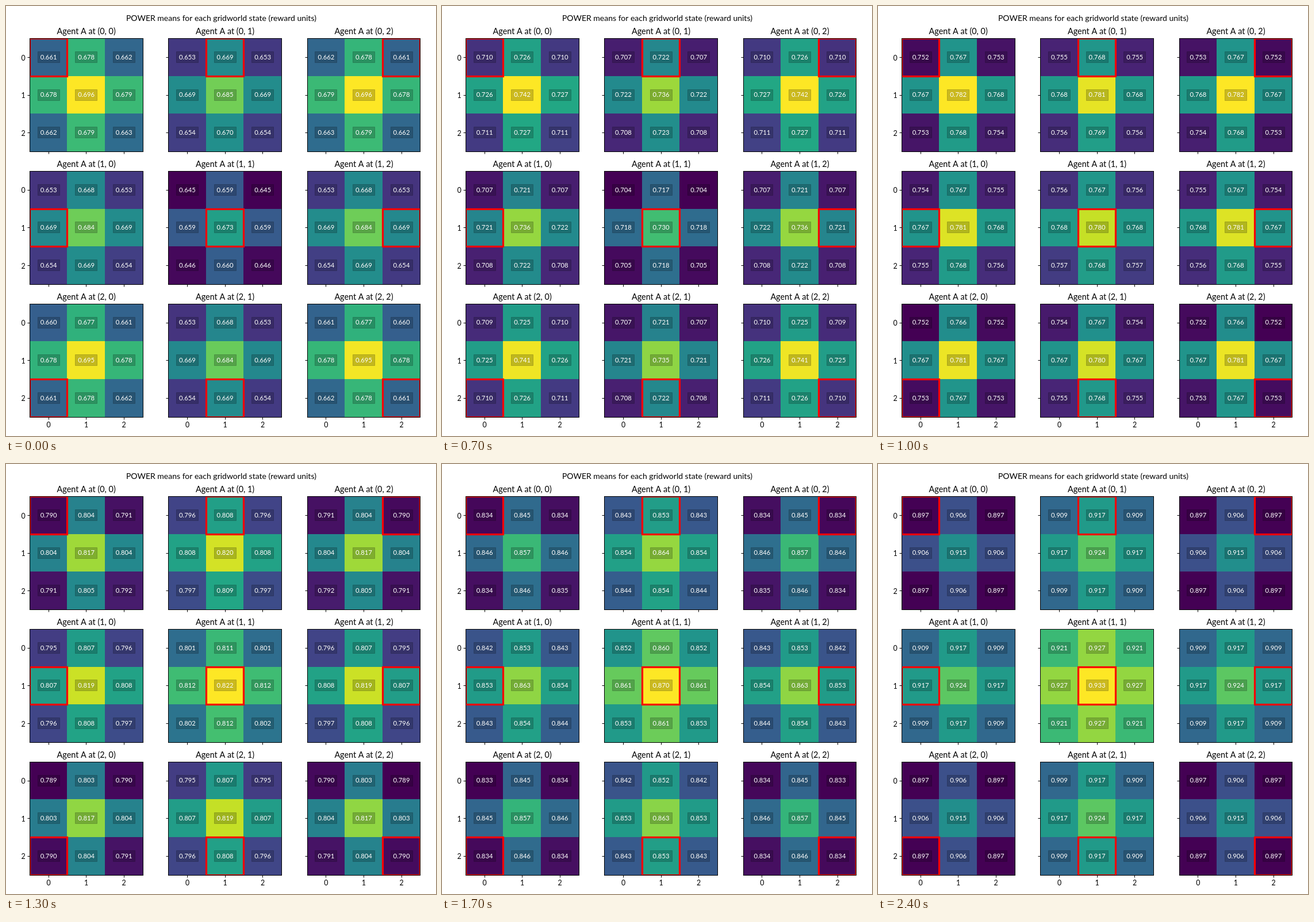
Animation, 748 px wide and 748 px high, one loop 3200 ms. Source, as an HTML page with a canvas:

```html
<!DOCTYPE html>
<html lang="en">
<head>
<meta charset="utf-8">
<title>POWER means</title>
<style>
  html, body { margin: 0; width: 100%; height: 100%; overflow: hidden; background: #fff; }
  canvas { display: block; }
</style>
</head>
<body>
<canvas id="stage" width="748" height="748"></canvas>
<script>
const ctx = document.getElementById('stage').getContext('2d');
const LOOP = 3200, HOLD = 500, STEP = 100, LAST = 20;
const LEFT = 41.3, TOP = 56.8, PITCH_X = 241.4, PITCH_Y = 230.8;
const SIZE = 196.7, CELL = SIZE / 3;
const FONT = 'Lato, "Open Sans", sans-serif';
const NINE = [...Array(9).keys()];

const viridis = ['440154', '482475', '414487', '355f8d', '2a788e', '21918c',
  '22a884', '44bf70', '7ad151', 'bddf26', 'fde725']
  .map(hex => [0, 2, 4].map(i => parseInt(hex.slice(i, i + 2), 16)));

const col = i => i % 3;
const row = i => Math.floor(i / 3);
const snap = v => Math.floor(v) + .5;

// 0 for a corner, 1 for an edge, 2 for the centre of a 3 x 3 grid.
const centrality = i => 2 - Math.abs(col(i) - 1) - Math.abs(row(i) - 1);

// Mean in thousandths: a rising base, a gain for central agents that starts
// negative, a shrinking gain for central states, and a slight tilt.
function mean(agent, state, s) {
  const a = centrality(agent), c = centrality(state);
  const base = 661.5 + 17.3 * s - .375 * s ** 2 + .005 * s ** 3;
  const agentGain = a * (-8 + 1.9 * s - .045 * s ** 2);
  const stateGain = c * (16.9 - .41 * s - 1.45 * a);
  const tilt = .5 * (row(state) - 1) - .4 * (row(agent) - 1)
    - .4 * (col(agent) - 1) * (col(state) - 1);
  return base + agentGain + stateGain + tilt * (1 - (s / LAST) ** 4);
}

function colour(u) {
  const p = u * (viridis.length - 1);
  const i = Math.min(viridis.length - 2, Math.floor(p));
  const rgb = viridis[i].map((c, k) => Math.round(c + (viridis[i + 1][k] - c) * (p - i)));
  return `rgb(${rgb})`;
}

function text(str, x, y, size, fill = '#000', align = 'center') {
  ctx.font = `${size}px ${FONT}`;
  ctx.textAlign = align;
  ctx.fillStyle = fill;
  ctx.fillText(str, x, y);
}

// Rectangle outline with every edge on a pixel centre.
function outline(x, y, size, color, width) {
  ctx.strokeStyle = color;
  ctx.lineWidth = width;
  ctx.strokeRect(snap(x), snap(y), snap(x + size) - snap(x), snap(y + size) - snap(y));
}

function drawState(value, share, x, y) {
  const x0 = Math.floor(x), y0 = Math.floor(y);
  ctx.fillStyle = colour(share);
  ctx.fillRect(x0, y0, Math.floor(x + CELL) - x0, Math.floor(y + CELL) - y0);
  const cx = x + CELL / 2, cy = y + CELL / 2;
  ctx.fillStyle = ctx.strokeStyle = 'rgba(0,0,0,.2)';
  ctx.lineWidth = 1;
  ctx.beginPath();
  ctx.rect(snap(cx - 19), snap(cy - 10), 38, 19);
  ctx.fill();
  ctx.stroke();
  text((value / 1000).toFixed(3), cx, cy + 3.2, 11.3, '#fff');
}

function drawAxes(agent, x, y) {
  outline(x, y, SIZE, '#000', 1);
  const left = snap(x), bottom = snap(y + SIZE);
  ctx.beginPath();
  for (let i = 0; i < 3; i++) {
    const mid = CELL * (i + .5);
    ctx.moveTo(left - 4, snap(y + mid));
    ctx.lineTo(left, snap(y + mid));
    ctx.moveTo(snap(x + mid), bottom);
    ctx.lineTo(snap(x + mid), bottom + 4);
    if (col(agent) === 0) text(i, 33.8, y + mid + 5, 12.4, '#000', 'right');
    if (row(agent) === 2) text(i, x + mid, 732.8, 12.4);
  }
  ctx.stroke();
}

function drawPanel(values, agent, low, high) {
  const x = LEFT + col(agent) * PITCH_X, y = TOP + row(agent) * PITCH_Y;
  values.forEach((value, i) => drawState(value, (value - low) / (high - low),
    x + col(i) * CELL, y + row(i) * CELL));

  ctx.save();
  ctx.beginPath();
  ctx.rect(x, y, SIZE, SIZE);
  ctx.clip();
  outline(x + col(agent) * CELL, y + row(agent) * CELL, CELL, '#f00', 3.2);
  ctx.restore();

  drawAxes(agent, x, y);
  text(`Agent A at (${row(agent)}, ${col(agent)})`, x + SIZE / 2, y - 7.4, 14.4);
}

function draw(now) {
  const t = now % LOOP;
  const step = t < HOLD ? 0 : Math.min(LAST, Math.floor((t - HOLD) / STEP) + 1);
  const grid = NINE.map(agent => NINE.map(state => mean(agent, state, step)));
  const all = grid.flat();
  const low = Math.min(...all), high = Math.max(...all);
  ctx.fillStyle = '#fff';
  ctx.fillRect(0, 0, 748, 748);
  text('POWER means for each gridworld state (reward units)', 374.4, 25.8, 14);
  grid.forEach((values, agent) => drawPanel(values, agent, low, high));
}

const start = performance.now();
function tick() {
  draw(performance.now() - start);
  requestAnimationFrame(tick);
}
tick();
</script>
</body>
</html>
```
